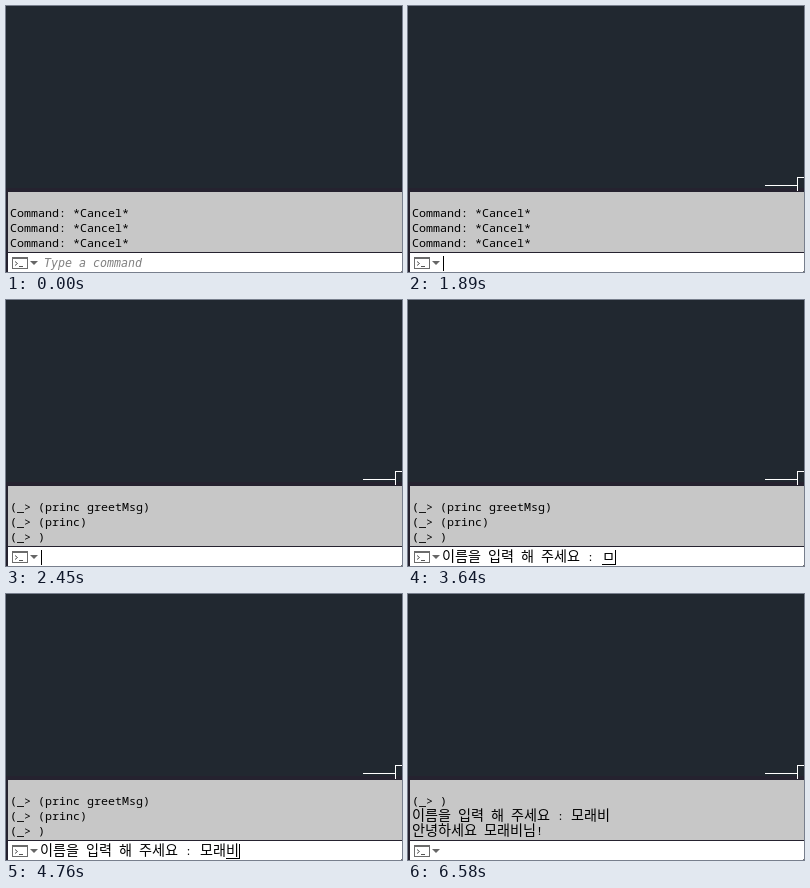
Write an HTML page that moves like this. It is 396 by 266 pixels and loops after 6720 ms.

```html
<!DOCTYPE html>
<html lang="ko">
<head>
<meta charset="utf-8">
<title>Command line greeting</title>
<style>
  html, body { margin: 0; width: 100%; height: 100%; overflow: hidden; background: #212830; }
  svg { display: block; width: 396px; height: 266px; }
  text { white-space: pre; font: 11.66px "Noto Sans Mono", monospace; fill: #000; }
  .hangul { font: 14.13px "Noto Sans CJK KR", "Noto Sans CJK", sans-serif; }
  #placeholder { font: italic 11.63px "DejaVu Sans Mono", monospace; fill: #808080; }
</style>
</head>
<body>
<svg viewBox="0 0 396 266" shape-rendering="crispEdges">
  <rect width="396" height="266" fill="#212830"/>
  <path id="crosshair" d="M357 179.5H389M389.5 186V171.5H396" fill="none" stroke="#fff"/>

  <rect y="182" width="396" height="84" fill="#25222f"/>
  <path d="M389.5 182V185" id="crosshairTail" stroke="#fff"/>
  <rect x="2" y="186" width="394" height="60" fill="#c7c7c7"/>
  <rect x="2" y="247" width="394" height="19" fill="#fff"/>
  <rect x="395" y="265" width="1" height="1" fill="#777"/>

  <rect x="6.5" y="251.5" width="15" height="11" fill="#fff" stroke="#6b6b6b"/>
  <rect x="6" y="251" width="16" height="2" fill="#6b6b6b"/>
  <path d="M9 255.5L11.5 257.5L9 259.5M13 260.5H17" fill="none" stroke="#555" shape-rendering="auto"/>
  <path d="M24 255H32L28 259Z" fill="#666" shape-rendering="auto"/>

  <text class="history" x="4" y="211"></text>
  <text class="history" x="4" y="226"></text>
  <text class="history" x="4" y="241"></text>
  <text id="placeholder" x="38" y="261">Type a command</text>
  <text id="prompt" x="34" y="261"></text>
  <text id="typed" x="194" y="261"></text>
  <rect id="underline" y="264" width="13" height="1"/>
  <rect id="cursor" y="250" width="1" height="15"/>
</svg>
<script>
const LOOP = 6720, HOME = 35, NAME_X = 194, SYLLABLE = 13;
const NAME = '모래비', PROMPT = '이름을 입력 해 주세요 : ';
const cancelled = Array(3).fill('Command: *Cancel*');
const code = ['(_> (princ greetMsg)', '(_> (princ)', '(_> )'];
const answer = PROMPT + NAME;

const compose = typed => ({ typed, cursor: NAME_X + SYLLABLE * typed.length });

// Each step overrides part of the state before it.
const steps = [
  [0, { history: cancelled, placeholder: true, crosshair: false, prompt: '', typed: '', cursor: null }],
  [700, { placeholder: false, cursor: HOME }],
  [1260, { cursor: null }],
  [1820, { cursor: HOME }],
  [1890, { crosshair: true }],
  [1960, { history: code }],
  [2380, { crosshair: false, cursor: null }],
  [2450, { crosshair: true, cursor: HOME }],
  [2520, { prompt: PROMPT, cursor: NAME_X }],
  [3080, { cursor: null }],
  [3640, compose('ㅁ')],
  [3780, compose('모')],
  [4060, compose('몰')],
  [4130, compose('모래')],
  [4200, compose('모랩')],
  [4340, compose(NAME)],
  [4830, { history: [code[1], code[2], answer], crosshair: false, prompt: '', typed: '', cursor: HOME }],
  [4900, { history: [code[2], answer, `안녕하세요 ${NAME}님!`], crosshair: true }],
  [5530, { cursor: null }],
  [6020, { cursor: HOME }],
  [6580, { cursor: null }]
];

const byId = id => document.getElementById(id);
const historyLines = document.querySelectorAll('.history');
const show = (id, visible) => byId(id).style.display = visible ? '' : 'none';

function setText(node, text) {
  const markup = text.replace(/&/g, '&amp;').replace(/</g, '&lt;').replace(/>/g, '&gt;')
    .replace(/[ㄱ-ㅎ가-힣]+/g, '<tspan class="hangul">$&</tspan>');
  node.innerHTML = markup;
}

function render(state) {
  historyLines.forEach((line, i) => setText(line, state.history[i]));
  setText(byId('prompt'), state.prompt);
  setText(byId('typed'), state.typed);
  show('placeholder', state.placeholder);
  show('crosshair', state.crosshair);
  show('crosshairTail', state.crosshair);
  show('cursor', state.cursor !== null);
  show('underline', state.typed);
  byId('cursor').setAttribute('x', state.cursor ?? 0);
  byId('underline').setAttribute('x', NAME_X + SYLLABLE * (state.typed.length - 1));
}

const start = performance.now();
let shown = 0;
function tick() {
  const time = (performance.now() - start) % LOOP;
  const count = steps.filter(([at]) => at <= time).length;
  if (count !== shown) {
    render(Object.assign({}, ...steps.slice(0, count).map(([, change]) => change)));
    shown = count;
  }
  requestAnimationFrame(tick);
}
tick();
</script>
</body>
</html>
```
